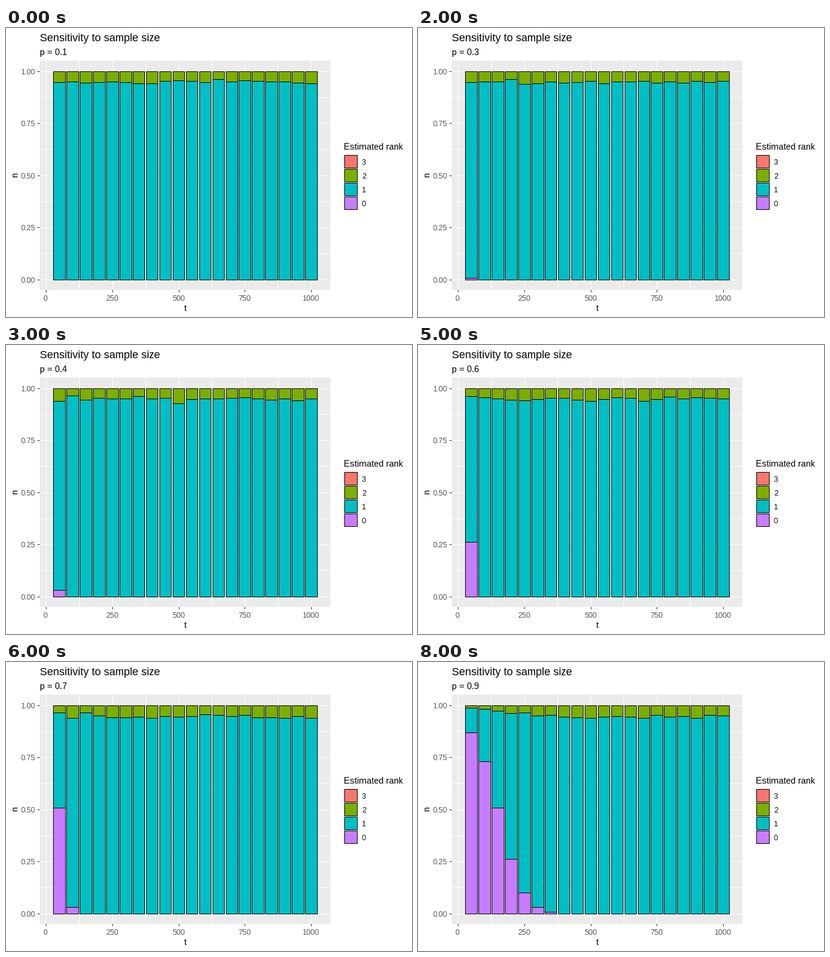
Write a matplotlib script that moves like this. It is 672 px wide and 480 px high and loops after 9 s.

```python
import numpy as np
import matplotlib.pyplot as plt
from matplotlib.animation import FuncAnimation
from matplotlib.patches import Rectangle

W, H, DPI = 672, 480, 96
LEFT, RIGHT, TOP, BOTTOM = 56, 537, 54, 435   # panel edges
Y_ONE, Y_ZERO = 72, 418                       # rows of n = 1 and n = 0
RANK_COLORS = {3: "#F8766D", 2: "#7CAE00", 1: "#00BFC4", 0: "#C77CFF"}
SIZES = np.arange(50, 1001, 50)

plt.rcParams.update({
    "font.family": "Liberation Sans",
    "text.hinting": "no_autohint",
    "text.hinting_factor": 1,
})
fig = plt.figure(figsize=(W / DPI, H / DPI), dpi=DPI, facecolor="white")
ax = fig.add_axes([0, 0, 1, 1])
ax.set_xlim(0, W)
ax.set_ylim(H, 0)
ax.axis("off")


def px(t):
    return round(LEFT + (t + 22.25) * (RIGHT - LEFT) / 1094.5)


def py(n):
    return round(417.7 - 346.1 * n)


def fill(x, y, w, h, color):
    return ax.add_patch(Rectangle((x, y), w, h, fc=color, lw=0, antialiased=False))


def label(x, y, text, size, color="black", **kw):
    return ax.text(x, y, text, fontsize=size * 72 / DPI, color=color,
                   va="baseline", **kw)


def draw_panel():
    fill(LEFT, TOP, RIGHT - LEFT, BOTTOM - TOP, "#EBEBEB")
    for t in range(0, 1001, 125):
        fill(px(t), TOP, 1, BOTTOM - TOP, "white")
    for n in np.arange(0, 1.01, 0.125):
        fill(LEFT, py(n), RIGHT - LEFT, 1, "white")
    for t in range(0, 1001, 250):
        fill(px(t), BOTTOM, 1, 4, "#333333")
        label(px(t) - 0.5, 453, str(t), 12, "#4D4D4D", ha="center")
    for n in np.arange(0, 1.01, 0.25):
        fill(LEFT - 4, py(n), 4, 1, "#333333")
        label(49, py(n) + 5, f"{n:.2f}", 12, "#4D4D4D", ha="right")
    label(296.5, 470, "t", 15, ha="center")
    label(19, 244.5, "n", 15, ha="center", rotation=90, rotation_mode="anchor")


def draw_legend():
    label(559, 202, "Estimated rank", 15)
    fill(559, 210, 23, 92, "#F2F2F2")
    for i, (rank, color) in enumerate(RANK_COLORS.items()):
        y = 211 + 23 * i
        fill(560, y, 22, 22, "black")
        fill(561, y + 1, 20, 20, color)
        label(589, y + 16, str(rank), 12)


def make_bar(t):
    x0, x1 = px(t - 22.5), px(t + 22.5)
    fill(x0, Y_ONE, x1 - x0 + 1, Y_ZERO - Y_ONE + 1, "black")
    return [fill(x0 + 1, Y_ONE + 1, x1 - x0 - 1, 0, RANK_COLORS[r])
            for r in (2, 1, 0)]


def shares(p, seed):
    """Shares of rank 0 and rank 2 for every sample size."""
    c = SIZES * (1 - p)
    rank0 = 1 / (1 + np.exp(-2.72 + 0.155 * c + 0.0016 * c**2))
    noise = np.random.default_rng(seed).normal(0, 0.006, len(SIZES))
    rank2 = (0.051 + noise) * (1 - 0.8 * rank0)
    return rank0, rank2


draw_panel()
draw_legend()
label(56, 22, "Sensitivity to sample size", 18)
subtitle = label(56, 45, "", 15)
bars = [make_bar(t) for t in SIZES]


def update(frame):
    p = (frame + 1) / 10
    subtitle.set_text(f"p = {p:.1f}")
    span = Y_ZERO - Y_ONE
    for segments, low, high in zip(bars, *shares(p, frame)):
        edges = [Y_ONE, Y_ONE + round(span * high), Y_ZERO - int(span * low), Y_ZERO]
        for seg, a, b in zip(segments, edges, edges[1:]):
            seg.set_y(a + 1)
            seg.set_height(max(b - a - 1, 0))
    return [subtitle, *(s for bar in bars for s in bar)]


anim = FuncAnimation(fig, update, frames=9, interval=1000, repeat=True,
                     repeat_delay=0, blit=False)
plt.show()
```
